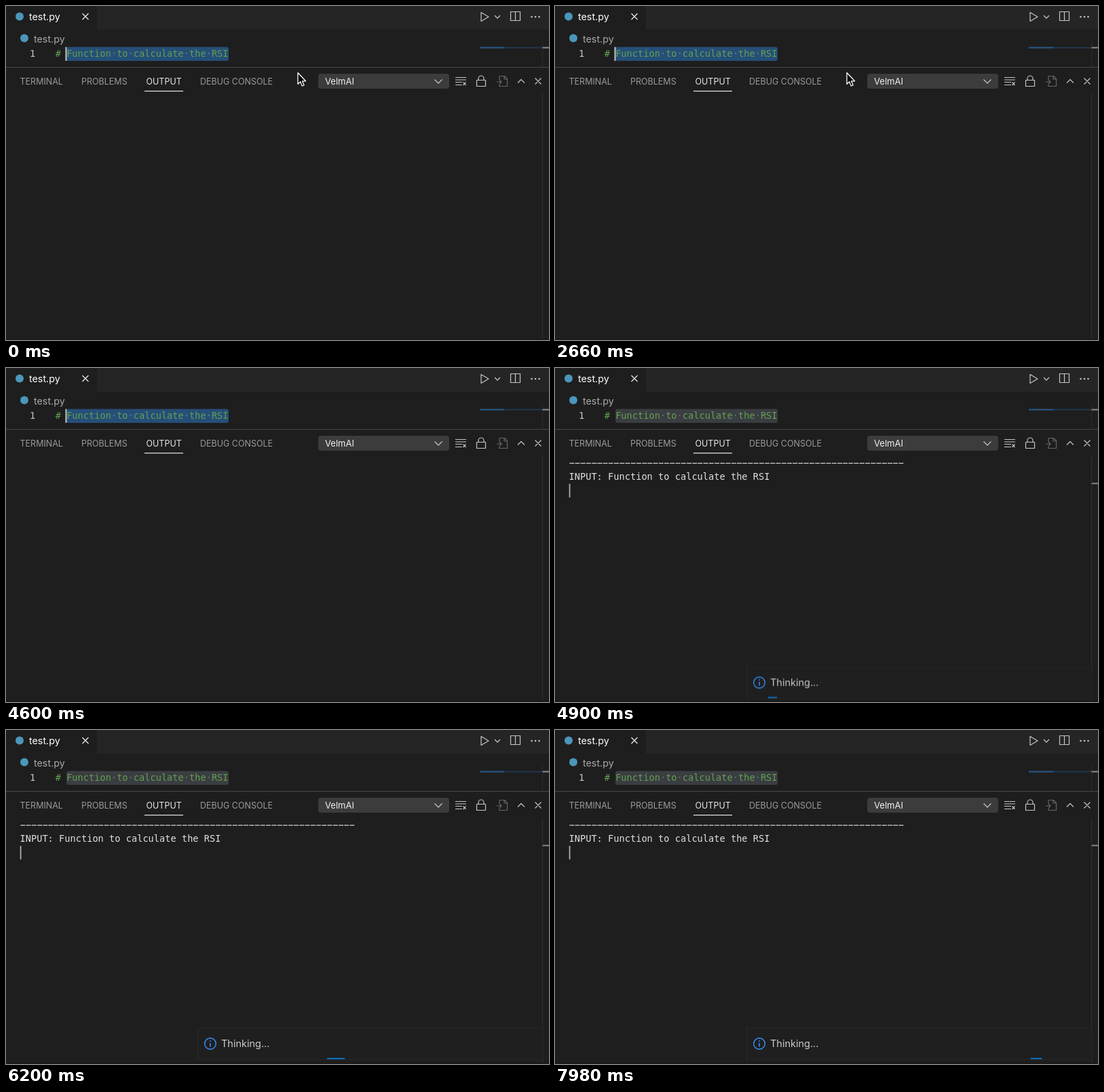
Recreate the animation shown at these times as an HTML page. Size 800 by 493 pixels, loop 8000 ms.

```html
<!DOCTYPE html>
<html lang="en">
<head>
<meta charset="utf-8">
<title>Editor</title>
<style>
  html, body { margin: 0; width: 100%; height: 100%; overflow: hidden; background: #1e1e1e; }
  svg { display: block; width: 100vw; height: 100vh; }
  text { font-family: Inter, "Open Sans", sans-serif; font-size: 14.3px; white-space: pre; }
  .code { font-family: "DejaVu Sans Mono", "Noto Sans Mono", monospace; font-size: 13.66px; }
  .tabs { font-size: 12.5px; fill: #9a9a9a; }
  .line { fill: none; stroke: #c5c5c5; stroke-width: 1.2; stroke-linejoin: round; }
  #bit { transform-box: fill-box; transform-origin: center; }
</style>
</head>
<body>
<svg viewBox="0 0 800 493">
  <rect width="800" height="493" fill="#1e1e1e"/>
  <rect x="134" width="666" height="35" fill="#252526"/>

  <!-- tab, breadcrumb, toolbar -->
  <circle cx="20" cy="15.500" r="6" fill="#4b96ba"/>
  <text x="34" y="21" fill="#fff">test.py</text>
  <path class="line" style="stroke:#f0f0f0" d="M112.500 11l9 9m0-9l-9 9"/>
  <circle cx="27" cy="47.500" r="6" fill="#4b96ba"/>
  <text x="41" y="53.500" fill="#a9a9a9">test.py</text>
  <path class="line" d="M700 9.500v13l11-6.500zM720 14l4 4 4-4M743.500 8.500h14v13h-14zM750.500 8.500v13"/>
  <g fill="#c5c5c5">
    <circle cx="774.500" cy="16" r="1.300"/><circle cx="780" cy="16" r="1.300"/><circle cx="785.500" cy="16" r="1.300"/>
  </g>

  <!-- editor line -->
  <rect id="active" x="89" y="60.500" width="239" height="20.500" rx="3" fill="#264f78"/>
  <rect id="inactive" x="89" y="60.500" width="239" height="20.500" rx="3" fill="#3a3d41"/>
  <text class="code" x="35" y="75" fill="#c6c6c6">1</text>
  <text class="code" x="72.700" y="75" fill="#62a050"># Function to calculate the RSI</text>
  <text class="code" x="72.700" y="75" fill="#e3e4e2" fill-opacity=".3">          ·  ·         ·   ·</text>
  <rect id="cursor" x="87.500" y="60.500" width="2" height="20.500" fill="#c4c5c3"/>
  <rect x="698" y="60.500" width="36" height="2" fill="#275a8c"/>
  <rect x="734" y="60.500" width="56" height="2" fill="#20384f"/>
  <rect x="790" y="52" width="1" height="38" fill="#2b2b2b"/>
  <rect x="790.500" y="60.500" width="9.500" height="2" fill="#8c8c8c"/>

  <!-- panel header -->
  <rect y="90" width="800" height="1" fill="#484848"/>
  <g class="tabs">
    <text class="tabs" x="20.500" y="115.500">TERMINAL</text>
    <text class="tabs" x="111" y="115.500">PROBLEMS</text>
    <text class="tabs" x="206.500" y="115.500" style="fill:#e7e7e7">OUTPUT</text>
    <text class="tabs" x="286" y="115.500">DEBUG CONSOLE</text>
  </g>
  <rect x="204" y="125" width="57" height="1.200" fill="#e7e7e7"/>
  <rect x="460" y="100" width="193" height="22" rx="4" fill="#3c3c3c"/>
  <text x="470" y="116" fill="#f0f0f0" style="font-size:13px">VelmAI</text>
  <path class="line" d="M631.500 108.500l5.500 5.500 5.500-5.500"/>
  <path class="line" d="M662 105.500h16M662 109h16M662 112.500h10M662 116.500h10M673.500 112.500l4 4.500m0-4.500l-4 4.500"/>
  <path class="line" d="M693.500 109.500h13v9h-13zM696 109.500v-2.500a4 4 0 0 1 8 0v2.500"/>
  <path class="line" style="stroke:#666" d="M727 109v-5.500h7.500l4 4v11H727v-3M734 103.500v4.500h4.500M723 112h7m-3-3l3 3-3 3"/>
  <path class="line" d="M754 113.500l5-5 5 5M779.500 106.500l9 9m0-9l-9 9"/>
  <rect x="790" y="130" width="1" height="363" fill="#303030"/>

  <g id="output" fill="#e0e0e0">
    <text class="code" id="rule" x="20.500" y="144.500"></text>
    <text class="code" x="20.500" y="165">INPUT: Function to calculate the RSI</text>
    <rect x="20.700" y="171" width="1.800" height="20" fill="#aeafad"/>
    <rect x="790.500" y="169.500" width="9.500" height="2" fill="#858585"/>
  </g>

  <g id="toast">
    <rect x="282.500" y="440" width="508.500" height="47" fill="#1f1f20" stroke="#292929"/>
    <circle cx="301" cy="463" r="8.300" fill="none" stroke="#3794ff" stroke-width="1.400"/>
    <path d="M301 462v5.500M301 458.300v1.700" stroke="#3794ff" stroke-width="1.500"/>
    <text x="317" y="468" fill="#ccc" style="font-size:14.500px">Thinking...</text>
    <rect id="bit" x="282.300" y="483.800" width="10.180" height="2.300" fill="#0e70c0"/>
  </g>
  <rect y="491.500" width="800" height="1.500" fill="#19171a"/>

  <g id="prompt">
    <rect x="164" y="4" width="471" height="71" rx="5" fill="#252526" stroke="#1a1a1a"/>
    <rect x="171.500" y="11.500" width="456" height="29" rx="2" fill="#3c3c3c" stroke="#007fd4"/>
    <rect id="mark" x="178" y="16" height="20" fill="#264f78"/>
    <text id="value" x="178" y="31" fill="#ddd">Function to calculate the RSI</text>
    <text x="174" y="62" fill="#ccc">Press 'Enter' to confirm or 'Escape' to cancel</text>
  </g>

  <path id="pointer" d="M430 98.500v16.800l3.700-3.500 2.600 6.200 2.800-1.200-2.600-6h5z"
        fill="#000" stroke="#fff" stroke-width="1.300" stroke-linejoin="round"/>
</svg>
<script>
  const LOOP = 8000, BLUR = 2800, SUBMIT = 4580, REPLY = 4640;
  const $ = id => document.getElementById(id);

  // Rows are [time, properties, easing to the next row].
  const play = (id, rows) => $(id).animate(
    rows.map(([t, props, easing = 'linear']) => ({ ...props, offset: t / LOOP, easing })),
    { duration: LOOP, iterations: Infinity });

  // Visible only inside the given [from, to) spans.
  const show = (id, ...spans) => {
    const rows = spans.flatMap(([a, b]) => [[a, 1], [b, 0]]);
    if (rows[0][0] > 0) rows.unshift([0, 0]);
    if (rows[rows.length - 1][0] < LOOP) rows.push([LOOP, 0]);
    play(id, rows.map(([t, opacity]) => [t, { opacity }, 'step-end']));
  };

  $('rule').textContent = '−'.repeat(60);
  $('mark').setAttribute('width', $('value').getComputedTextLength());

  show('cursor', [0, 160], [660, 1160], [1660, 2160], [2660, BLUR], [SUBMIT, REPLY]);
  show('active', [0, BLUR], [SUBMIT, REPLY]);
  show('inactive', [BLUR, SUBMIT], [REPLY, LOOP]);
  show('prompt', [BLUR, SUBMIT]);
  show('pointer', [0, SUBMIT]);
  show('output', [REPLY, LOOP]);

  const low = { opacity: 0, transform: 'translateY(48px)' };
  const up = { opacity: 1, transform: 'translateY(0px)' };
  play('toast', [[0, low], [REPLY, low, 'ease-out'], [REPLY + 300, up], [LOOP, up]]);

  // The bar grows to triple width halfway through a 4 s sweep.
  const bit = (x, scale) => ({ transform: `translateX(${x}px) scaleX(${scale})` });
  const part = (LOOP - REPLY - 2000) / 2000;
  play('bit', [
    [0, bit(0, 1)], [REPLY, bit(0, 1)], [REPLY + 2000, bit(254.5, 3)],
    [LOOP, bit(254.5 + 249.4 * part, 3 - 2 * part)]
  ]);
</script>
</body>
</html>
```
